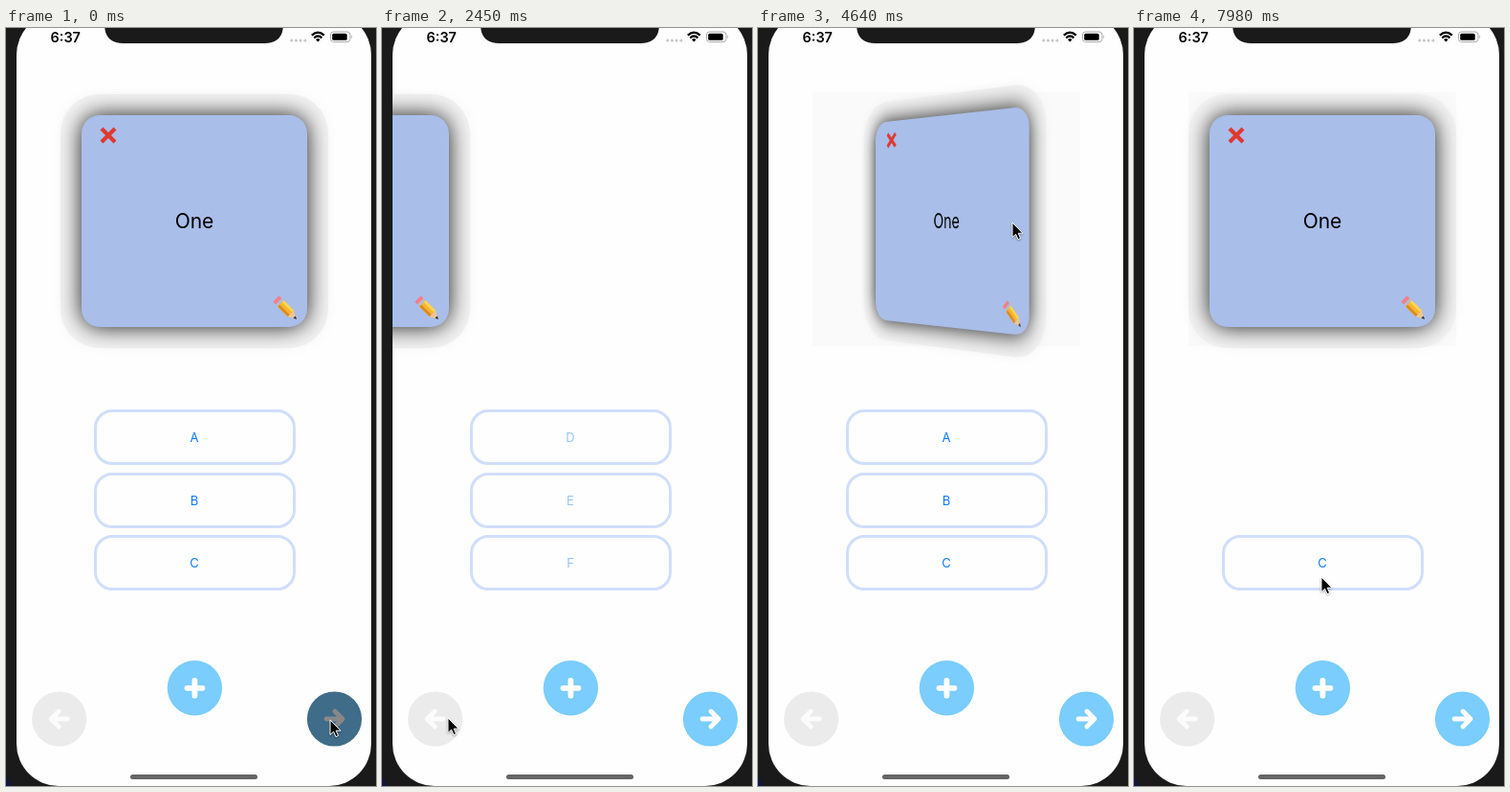
These frames come from a looping animation (387x791 px, 8000 ms). An HTML page:

```html
<!DOCTYPE html>
<html lang="en">
<head>
<meta charset="utf-8">
<title>Flashcards</title>
<style>
html, body { margin: 0; width: 100%; height: 100%; overflow: hidden; background: #1a1a1a; }
body { position: relative; font-family: Inter, "Liberation Sans", sans-serif; }
div, svg { position: absolute; box-sizing: border-box; }
#screen { left: 0; top: 0; width: 387px; height: 791px; background: #fefefe;
  clip-path: inset(-16px 5px 0 11px round 44px); }
#halo { left: 57px; top: 67px; width: 280px; height: 265px; background: #fafafa; }
#card { left: 79px; top: 91px; width: 236px; height: 221px; border-radius: 19px;
  box-shadow: 0 0 24px rgba(0,0,0,.9), 0 0 0 22px #f4f4f4; }
#word, .opt { display: flex; align-items: center; justify-content: center; }
#word { inset: 0; color: #000; }
.opt { left: 91.5px; width: 211px; height: 58px; border: 3px solid #d1defb; border-radius: 19px;
  color: #0a7bf5; font-size: 13px; }
svg { left: 0; top: 0; overflow: visible; }
</style>
</head>
<body>
<div id="screen">
  <div id="halo"></div>
  <div id="card">
    <div id="word"></div>
    <svg width="236" height="221">
      <path d="M21 14L35 28M35 14L21 28" stroke="#e0382f" stroke-width="4.2"/>
      <g transform="translate(203.5 191.5) rotate(45)">
        <path d="M0 -3.5Q0 -4.5 1 -4.5H4V4.5H1Q0 4.5 0 3.5Z" fill="#f0808c"/>
        <path d="M4 -4.5H7V4.5H4Z" fill="#b9bcc2"/>
        <path d="M7 -4.5H22V4.5H7Z" fill="#f7b52c"/>
        <path d="M7 -4.5H22V-1.7H7Z" fill="#fdd45c"/>
        <path d="M7 1.8H22V4.5H7Z" fill="#dc8a1c"/>
        <path d="M22 -4.5L30 0L22 4.5Z" fill="#edc796"/>
        <path d="M27 -1.7L30.5 0L27 1.7Z" fill="#333"/>
      </g>
    </svg>
  </div>
  <div class="opt" style="top:398px"><span></span></div>
  <div class="opt" style="top:463.5px"><span></span></div>
  <div class="opt" style="top:529px"><span></span></div>
  <svg width="387" height="791">
    <g fill="none" stroke="#fff" stroke-width="4.8" stroke-linejoin="round" stroke-linecap="round">
      <g id="prev" transform="translate(55.7 721) scale(-1 1)">
        <circle r="28.6" stroke="none"/><path d="M-8.5 0H7M.5 -8L8.5 0L.5 8"/>
      </g>
      <g id="next" transform="translate(343.5 721)">
        <circle r="28.6" stroke="none"/><path d="M-8.5 0H7M.5 -8L8.5 0L.5 8"/>
      </g>
      <g transform="translate(197.4 688.8)">
        <circle r="28.7" stroke="none" fill="#7acdfd"/>
        <path d="M-8 0H8M0 -8V8" stroke-width="5.8"/>
      </g>
    </g>
    <rect x="130" y="779" width="133" height="5" rx="2.5" fill="#666"/>
    <path d="M103 -20V-4Q103 16 123 16H270Q290 16 290 -4V-20Z" fill="#1a1a1a"/>
    <text x="46.5" y="14.6" font-size="14.5" font-weight="600">6:37</text>
    <path d="M298.7 13H314" stroke="#c8c8c8" stroke-width="3.2" stroke-linecap="round" stroke-dasharray="0 4.7"/>
    <g fill="none" stroke="#000" stroke-width="2.2">
      <path d="M319.8 7.6Q326.3 1.8 332.8 7.6M322.2 10.3Q326.3 6.7 330.4 10.3"/>
      <path d="M324 12L326.3 14.6L328.6 12Q326.3 10 324 12Z" fill="#000" stroke="none"/>
    </g>
    <rect x="339.5" y="4" width="20.5" height="10.5" rx="3" fill="none" stroke="#aaa"/>
    <rect x="341.2" y="5.7" width="15.5" height="7.1" rx="1.6"/>
    <path d="M361.3 7.5Q363.2 9.2 361.3 11Z" fill="#aaa"/>
  </svg>
</div>
<svg width="387" height="791">
  <path d="M0 781Q4 785 6 791H0Z" fill="#12163c"/>
  <circle id="tap" cx="268.5" cy="203" r="10" fill="none" stroke="#000"/>
  <path id="cursor" d="M0 0V15.5L3.6 12.2L6 17.6L8.6 16.5L6.2 11.2H11Z" stroke="#fff"
    style="filter:drop-shadow(0 1px 1px rgba(0,0,0,.35))"/>
</svg>
<script>
const LOOP = 8000, SLIDE = 300;
const $ = id => document.getElementById(id);
const opts = [...document.querySelectorAll('.opt')];
const between = (t, a, b) => t >= a && t < b;
const ease = (t, start, dur) => {
  const p = Math.min(1, Math.max(0, (t - start) / dur));
  return p * p * (3 - 2 * p);
};

// time, x, y of the pointer tip
const path = [
  [0, 339, 722], [450, 339, 722], [860, 217, 688], [1000, 217, 688], [1490, 69, 720],
  [2930, 69, 720], [3280, 211, 692], [3950, 211, 692], [4000, 211, 679], [4050, 211, 679],
  [4170, 268, 204], [4300, 268, 204], [4350, 266, 203], [5940, 266, 203], [5990, 263, 223],
  [6300, 195, 438], [6760, 195, 438], [7000, 188, 505], [7230, 188, 505], [7400, 198, 550],
  [7570, 196, 588], [7810, 196, 588], [7980, 196, 573], [LOOP, 196, 573]
];
function pointer(t) {
  const i = path.findIndex(k => k[0] > t);
  const [t0, x0, y0] = path[i - 1], [t1, x1, y1] = path[i];
  const p = ease(t, t0, t1 - t0);
  return [x0 + (x1 - x0) * p, y0 + (y1 - y0) * p];
}

// side: -1 leaves to the left and enters from the right, 1 the reverse
const slides = [{ start: 145, side: -1 }, { start: 2069, side: 1 }];
const flips = [4540, 5262];
const looks = {
  on: ['#7acdfd', '#fff'], off: ['#ebebeb', '#fbfbfb'], down: ['#3f6c88', '#888']
};
function paint(id, look) {
  const [disc, arrow] = $(id).children;
  disc.style.fill = looks[look][0];
  arrow.style.stroke = looks[look][1];
}

function draw(t) {
  let shift = 0, fade = 1, angle = 0;
  for (const { start, side } of slides) {
    const mid = start + SLIDE;
    if (between(t, start, mid)) shift = side * 300 * ease(t, start, SLIDE);
    if (between(t, mid, mid + SLIDE)) shift = -side * 300 * (1 - ease(t, mid, SLIDE));
    if (between(t, mid, mid + 150)) fade = 1 - ease(t, mid, 150);
    if (between(t, mid + 150, mid + 400)) fade = ease(t, mid + 150, 250);
  }
  for (const start of flips) {
    const p = ease(t, start, SLIDE);
    if (p < 1) angle += p < .5 ? -180 * p : 180 * (1 - p);
  }
  const [first, second] = slides.map(s => s.start + SLIDE);
  const back = between(t, flips[0] + SLIDE / 2, flips[1] + SLIDE / 2);
  $('card').style.transform = `translateX(${shift}px) perspective(1100px) rotateY(${angle}deg)`;
  $('card').style.background = back ? '#d1defb' : '#a9bee9';
  $('word').textContent = back ? 'C' : between(t, first, second) ? 'Two' : 'One';
  $('word').style.fontSize = back ? '27px' : '21px';
  $('halo').style.visibility = t >= flips[0] ? 'visible' : 'hidden';

  const letters = between(t, first + 150, second + 150) ? 'DEF' : 'ABC';
  const hideAt = [6480, 7090, LOOP];
  opts.forEach((opt, i) => {
    const label = opt.firstChild, held = t >= hideAt[i] - 70 && hideAt[i] < LOOP;
    label.textContent = letters[i];
    label.style.opacity = held ? .2 : fade;
    opt.style.visibility = t < hideAt[i] ? 'visible' : 'hidden';
  });

  const onSecond = between(t, 160, 2090);
  paint('prev', !onSecond ? 'off' : t >= 1910 ? 'down' : 'on');
  paint('next', onSecond ? 'off' : t < 160 ? 'down' : 'on');

  const tapped = between(t, 4350, 4470) || between(t, 5160, 5280);
  $('tap').style.visibility = tapped ? 'visible' : 'hidden';
  $('cursor').setAttribute('transform', `translate(${pointer(t)})`);
}

const begin = performance.now();
function tick() {
  draw((performance.now() - begin) % LOOP);
  requestAnimationFrame(tick);
}
tick();
</script>
</body>
</html>
```
